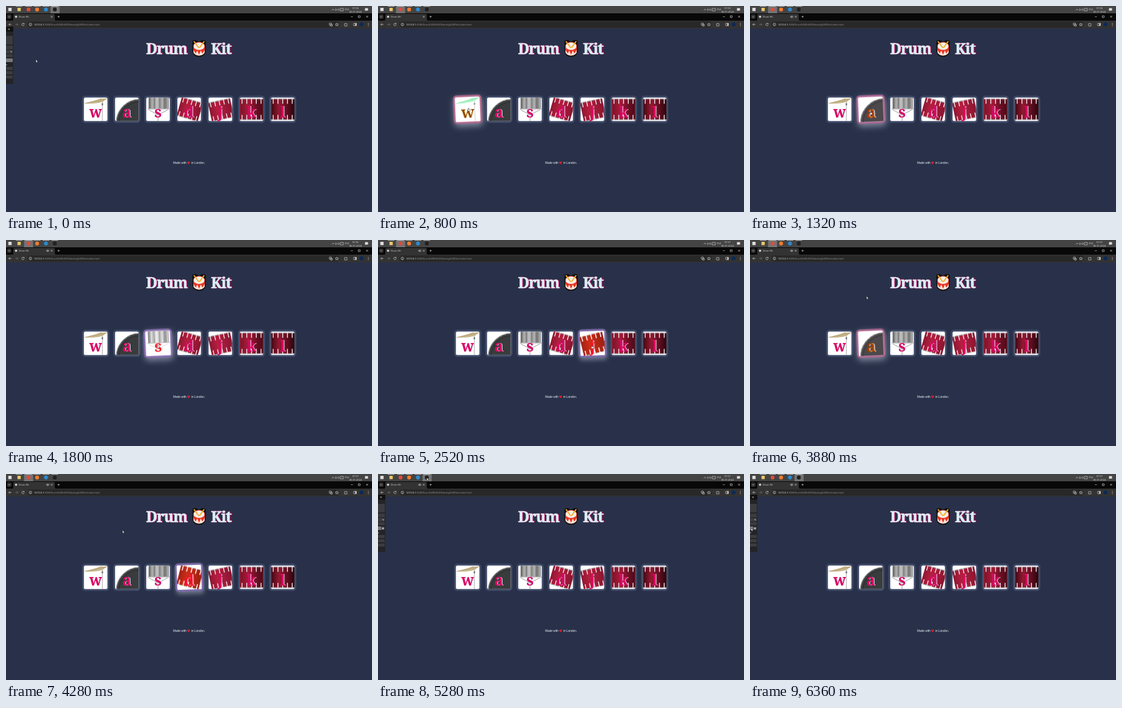
An HTML page for the animation above (6440 ms loop, 600 px wide and 338 px high).

```html
<!DOCTYPE html>
<html lang="en">
<head>
<meta charset="utf-8">
<title>Drum Kit</title>
<style>
  html, body { margin: 0; width: 100%; height: 100%; overflow: hidden; background: #283149; }
  svg { display: block; width: 100vw; height: 100vh; }
  text { font: 4px "Open Sans", sans-serif; fill: #ddd; }
  .title text { font: 600 24.4px "Noto Serif", serif; letter-spacing: -1.1px; fill: #dbedf3; stroke: #dbedf3; stroke-width: .6; filter: drop-shadow(1px 0 0 #da0463); }
  .key { font: 900 24.5px "Noto Serif", serif; fill: #da0463; text-anchor: middle; filter: drop-shadow(1px 0 0 #dbedf3); }
  .foot { font: 4.75px "Liberation Sans", Arial, sans-serif; fill: #eef6fa; }
  .url { font-size: 3.85px; }
  .mid { text-anchor: middle; }
  .line { fill: none; stroke: #ccc; stroke-width: .7; }
</style>
</head>
<body>
<svg viewBox="0 0 600 338" preserveAspectRatio="none">
  <defs>
    <clipPath id="inner"><rect x="-19.3" y="-19.3" width="38.6" height="38.6" rx="2.5"/></clipPath>
    <linearGradient id="shell">
      <stop stop-color="#8f1732"/><stop offset=".35" stop-color="#b51f40"/>
      <stop offset="1" stop-color="#8a1530"/>
    </linearGradient>
    <linearGradient id="dark">
      <stop stop-color="#7a1229"/><stop offset=".35" stop-color="#a81b39"/>
      <stop offset=".7" stop-color="#6e0f25"/><stop offset="1" stop-color="#4a0a18"/>
    </linearGradient>
    <linearGradient id="deep">
      <stop stop-color="#3d0913"/><stop offset=".35" stop-color="#951831"/>
      <stop offset=".65" stop-color="#660e22"/><stop offset="1" stop-color="#2a060c"/>
    </linearGradient>
    <linearGradient id="steel">
      <stop stop-color="#7c7c7c"/><stop offset=".4" stop-color="#b4b4b4"/><stop offset="1" stop-color="#7a7a7a"/>
    </linearGradient>
  </defs>
  <rect width="600" height="338" fill="#283149"/>

  <!-- taskbar -->
  <rect width="600" height="12" fill="#444"/>
  <rect id="focus" y="0" width="15" height="12" fill="#737373"/>
  <g id="apps"></g>
  <path class="line" d="M534 7l2-2 2 2M541 4q-2 2 0 4M545 4q2 2 0 4M548 4h5v4h-5z"/>
  <circle cx="543" cy="6" r=".8" fill="#ddd"/>
  <text x="555.5" y="7.4">PLK</text>
  <text id="clock" class="mid" x="573" y="4.6"></text>
  <text class="mid" x="573" y="10.9">06.01.2024</text>
  <path d="M588.5 3.5h5v4h-3l-1 1v-1h-1z" fill="#ddd"/>

  <!-- browser -->
  <rect y="12" width="600" height="12" fill="#080808"/>
  <rect x="1.8" y="14" width="7" height="7" rx="2" fill="#333"/>
  <path d="M10 24q2 0 2-2v-7q0-2 2-2h64q2 0 2 2v7q0 2 2 2z" fill="#333"/>
  <circle cx="16.5" cy="17.6" r="1.9" fill="#ccc"/>
  <text x="21" y="19.1">Drum Kit</text>
  <path id="sound" class="line" d="M66.5 17h1l1.2-1v3.4l-1.2-1h-1zM69.800 16.200q1.200 1.400 0 2.800"/>
  <path class="line" d="M73.600 16.200l2.800 2.800m0-2.800l-2.800 2.800M84.500 17.600h3.400M86.200 15.900v3.400M565.500 17.600h3M577.500 16h3v3h-3zM590.500 16l3 3m0-3l-3 3M4 17l1.300 1.300 1.300-1.300"/>
  <rect y="24" width="600" height="13" fill="#333"/>
  <rect x="35" y="25.300" width="512" height="10.200" rx="5.100" fill="#282828"/>
  <path class="line" d="M9 30.300h-4.500m2-2l-2 2 2 2M29.600 29.200a2 2 0 1 0 .2 1.800m0-3v1.600h-1.600M40 29.800v2M40 28.600v.5"/>
  <path class="line" stroke-opacity=".45" d="M15 30.300h4.500m-2-2l2 2-2 2"/>
  <circle class="line" cx="40" cy="30.300" r="2.200"/>
  <text class="url" x="46" y="31.700" fill-opacity=".65"><tspan fill="#fff" fill-opacity="1">127.0.0.1</tspan>:3000/Drum%20Kit%20Starting%20Files/index.html</text>
  <path class="line" d="M530 28h3.300v3.300h-3.300zM532 30h3v3h-3zM542.500 27.800l.8 1.800 1.900.1-1.500 1.200.5 1.900-1.700-1-1.700 1 .5-1.900-1.500-1.200 1.900-.1zM555 28.800h4v4h-4zM570 28.300h4.500v4H570z"/>
  <path d="M572.400 28.300h2.100v4h-2.100z" fill="#ccc"/>
  <circle cx="583" cy="30.200" r="3.200" fill="#0c2a55"/>
  <path d="M594 28v4.800" stroke="#ccc" stroke-width="1" stroke-dasharray="1 .9"/>

  <!-- page -->
  <g class="title">
    <text x="229.500" y="79.300">Drum</text>
    <text x="336" y="79.300">Kit</text>
  </g>
  <g>
    <path d="M308 56h4l4.500 3 4.500-3h4q3 1 2.500 4v14q-1 9-11 9.500-10-.5-11-9.500V60q-.5-3 2.500-4z" fill="#111"/>
    <path d="M307 66v8q1 7 9.500 7.500 8.500-.5 9.500-7.500v-8z" fill="#e8321f"/>
    <path d="M307.500 72l3.500 6 2.700-5 2.800 7 2.800-7 2.700 5 3.500-6v5q-3 4-9 4.500-6-.5-9-4.500z" fill="#f8e3da"/>
    <ellipse cx="316.500" cy="66" rx="9.300" ry="6.600" fill="#f5efe6" stroke="#e8321f"/>
    <path d="M308.500 58.500l7 9.500M324.500 58.500l-7 9.500" stroke="#efb02e" stroke-width="2" stroke-linecap="round"/>
  </g>
  <text class="foot" x="274" y="259.200">Made with</text>
  <path d="M299.300 259.600l-2.300-2.200q-.7-2 1.100-2.100.9 0 1.200.8.4-.8 1.300-.8 1.700.1 1 2.100z" fill="#d8202d"/>
  <text class="foot" x="304" y="259.200">in London.</text>
  <g id="kit"></g>

  <!-- recorder window edge -->
  <g id="panel">
    <path d="M0 34h12v94H0z" fill="#232427"/>
    <path d="M0 34h12v8H0z" fill="#111"/>
    <path class="line" d="M3.500 36.800l2.600 2.600m0-2.600l-2.600 2.600"/>
    <path d="M0 49h11v14H0zM0 65h11v6H0zM0 72h11v6H0zM0 79h11v5H0zM0 100h11v5H0zM0 107h11v5H0zM0 114h11v5H0z" fill="#3b3c40"/>
    <path d="M0 86h11v6H0z" fill="#77787c"/>
    <path class="line" d="M7 74l2 2m0-2v2M0 96.500h2"/>
    <path id="pause" d="M5 86h6v6H5z" fill="#333"/>
    <path id="bars" d="M7 87.500v3.500M9 87.500v3.500" stroke="#fff"/>
  </g>
  <g id="cursor" stroke="#111" stroke-width=".4" fill="#fff">
    <path id="arrow" d="M0 0v4.400l1-.9.8 1.700.8-.4-.8-1.600h1.400z"/>
    <path id="hand" d="M-.6 0h1v2l2 .6v2.400h-3.200l-1.400-2 .6-.4 1 .6z"/>
  </g>
</svg>
<script>
const LOOP = 6440, PITCH = 51.1;
const $ = id => document.getElementById(id);
const lerp = (a, b, k) => a + (b - a) * k;
const range = (n, f) => Array.from({ length: n }, (_, i) => f(i)).join('');

// Programs as plain marks, the running ones with a bar above.
$('apps').innerHTML = [[6.5, '#ddd'], [21.5, '#e8c867'], [37, '#dd4b3e'], [51, '#f27a2c'], [65.5, '#2c8ad0'], [80, '#202020']]
  .map(([x, c], i) => (i < 2
    ? `<rect x="${x - 2.7}" y="3" width="5.4" height="5.4" fill="${c}"/>`
    : `<circle cx="${x}" cy="5.7" r="3.2" fill="${c}"/>`)
    + (i ? `<rect x="${x - 5.5}" width="11" height=".8" fill="#ccc"/>` : '')).join('');

// A lacquered shell with rims and lugs.
function shell(w, h, fill, lugs) {
  const step = w / lugs;
  const rods = y => range(lugs, i =>
    `<rect x="${-w / 2 + step * (i + .5) - .7}" y="${y}" width="1.4" height="9" rx=".5" fill="#eee"/>`);
  return `<rect x="${-w / 2}" y="${-h / 2}" width="${w}" height="${h}" fill="url(#${fill})"/>
    <path d="M${-w / 2} ${-h / 2}h${w}M${-w / 2} ${h / 2}h${w}" stroke="#a8959b" stroke-width="1.4"/>
    ${rods(-h / 2 - 1)}${rods(h / 2 - 8)}`;
}

const cymbal = `<path d="M11-13V20" stroke="#999" stroke-width=".9"/>
  <path d="M-19-9.500L2-15.500 8-18 11-17.500 19-18 12-12.500Q0-8.500-19-9.500z" fill="#c6b58b"/>
  <path d="M-18-10L18-17" stroke="#9d8a5c" stroke-width=".5"/>
  <rect x="9.800" y="-10" width="2.400" height="3.500" fill="#777"/>`;
const kick = `<circle cx="21" cy="22" r="38" fill="#393b3d" stroke="#666" stroke-width="1.500"/>
  <circle cx="21" cy="22" r="38.500" fill="none" stroke="#aaa" stroke-width="1.500" stroke-dasharray="1.500 5"/>
  <circle cx="21" cy="22" r="34" fill="none" stroke="#292b2c"/>`;
const snare = `<rect x="-15.500" y="-19.500" width="33" height="18.500" fill="url(#steel)"/>
  ${range(8, i => `<path d="M${-14 + i * 4.2}-19v18" stroke="${i % 2 ? '#ddd' : '#555'}" stroke-width=".8"/>`)}
  <path d="M-17-.5h36M-15 1L0 9 16 1M0 5v15" fill="none" stroke="#8d8d8d" stroke-width=".9"/>`;

const kit = [
  ['w', cymbal], ['a', kick], ['s', snare],
  ['d', `<g transform="translate(1) rotate(16)">${shell(36, 31, 'shell', 5)}</g>`],
  ['j', `<g transform="translate(1 1) rotate(-12)">${shell(37, 31, 'shell', 5)}</g>`],
  ['k', shell(39, 34, 'dark', 5)],
  ['l', shell(39, 34, 'deep', 5)]
];
$('kit').innerHTML = kit.map(([key, art]) => `<g>
  <rect class="frame" x="-20.800" y="-20.800" width="41.600" height="41.600" rx="4" fill="#fff" stroke="#404b69" stroke-width="3"/>
  <g clip-path="url(#inner)">${art}</g>
  <text class="key" y="13.500">${key}</text></g>`).join('');
const tiles = [...$('kit').children];

// [tile, start, length]
const hits = [
  [0, 640, 340], [1, 1120, 300], [2, 1560, 270], [3, 2020, 300], [4, 2497, 280], [5, 2790, 240], [6, 3030, 260],
  [0, 3560, 240], [1, 3790, 240], [2, 4020, 230], [3, 4257, 280], [4, 4540, 240]
];

// [time, x, y]
const route = [
  [0, 49, 88], [320, 60, 95], [620, 148, 166], [900, 149, 168], [1110, 198, 173], [1350, 198, 173],
  [1550, 249, 172], [1800, 249, 172], [2010, 300, 172], [2250, 300, 172], [2470, 351, 173], [2620, 351, 173],
  [2760, 402, 173], [2880, 402, 173], [3000, 453, 172], [3100, 453, 172], [3360, 210.5, 98.5],
  [3800, 191, 92.5], [4700, 191, 92.5], [5180, 80, 6], [5300, 80, 6], [6150, 2, 89], [LOOP, 2, 89]
];

function cursorAt(t) {
  const i = Math.max(1, route.findIndex(p => p[0] > t));
  const [t0, x0, y0] = route[i - 1], [t1, x1, y1] = route[i];
  const k = (t - t0) / (t1 - t0), ease = k * k * (3 - 2 * k);
  return [lerp(x0, x1, ease), lerp(y0, y1, ease)];
}

const show = (id, on) => $(id).style.display = on ? '' : 'none';

function draw(now) {
  const t = now % LOOP;
  tiles.forEach((tile, i) => {
    const hit = hits.find(([n, start, len]) => n === i && t >= start && t < start + len);
    const power = hit ? Math.sin(Math.PI * (t - hit[1]) / hit[2]) : 0;
    const pop = Math.min(1, power * 3);
    tile.setAttribute('transform',
      `translate(${147 + i * PITCH} 169.5) rotate(${-2.5 * pop}) scale(${1 + .05 * pop})`);
    tile.style.filter = power
      ? `hue-rotate(${85 * power}deg) brightness(${1 + .25 * pop}) drop-shadow(1px 4px ${5 * pop}px rgba(219,225,243,${.5 * pop}))` : '';
    tile.querySelector('.frame').setAttribute('stroke', power ? '#565f8c' : '#404b69');
  });

  const recorder = t < 320 || t > 5240;
  show('panel', recorder);
  show('pause', t > 5240);
  show('bars', t > 5240);
  show('sound', t > 1000);
  $('focus').setAttribute('x', recorder ? 73 : 29.5);
  $('clock').textContent = t < 2400 ? '07:56' : '07:57';

  const [x, y] = cursorAt(t);
  const column = Math.abs((x - 147 + PITCH / 2) % PITCH - PITCH / 2) < 22;
  const over = column && x > 124 && x < 477 && Math.abs(y - 169.5) < 22;
  $('cursor').setAttribute('transform', `translate(${x} ${y})`);
  show('arrow', !over);
  show('hand', over);
}

let start;
function frame(now) {
  start ??= now;
  draw(now - start);
  requestAnimationFrame(frame);
}
requestAnimationFrame(frame);
</script>
</body>
</html>
```
